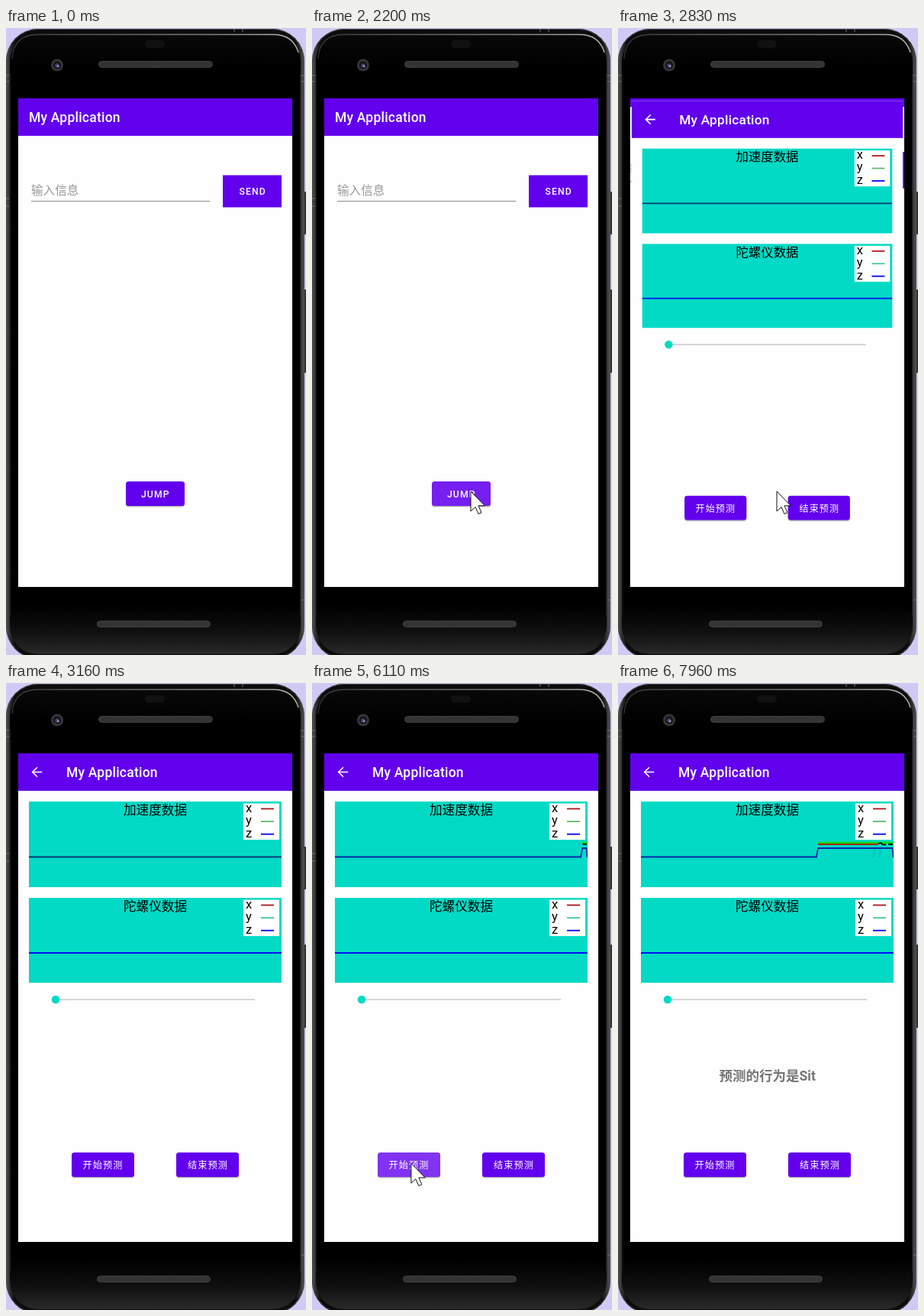
Recreate the animation shown at these times as an HTML page. Size 393x820 px, loop 8000 ms.

```html
<!DOCTYPE html>
<html lang="zh">
<head>
<meta charset="utf-8">
<title>My Application</title>
<style>
html, body { margin: 0; width: 100%; height: 100%; overflow: hidden; background: #cfcaf3; }
svg { display: block; width: 393px; height: 820px; }
text { font-family: Roboto, "Noto Sans CJK SC", "Noto Sans CJK", sans-serif; white-space: pre; }
.title { font-size: 17.5px; font-weight: 500; letter-spacing: .22px; fill: #fff; }
.label { font-size: 12.2px; font-weight: 500; letter-spacing: 1.09px; fill: #fff; }
.cn { font-weight: 400; }
.chart { font-size: 16.6px; fill: #000; }
.hint { font-size: 15.6px; fill: #999; }
.result { font-size: 17.5px; font-weight: 700; fill: #757575; }
</style>
</head>
<body>
<svg viewBox="0 0 393 820">
  <defs>
    <linearGradient id="rim" x1="0" x2="1" y1="0" y2="0">
      <stop offset="0" stop-color="#555"/>
      <stop offset=".008" stop-color="#3b3b3b"/>
      <stop offset=".03" stop-color="#0c0c0c"/>
      <stop offset=".97" stop-color="#0c0c0c"/>
      <stop offset=".99" stop-color="#3a3a3a"/>
      <stop offset="1" stop-color="#5a5a5a"/>
    </linearGradient>
    <linearGradient id="glass" x1="0" x2="0" y1="0" y2="1">
      <stop offset="0" stop-color="#080808"/>
      <stop offset=".06" stop-color="#000"/>
      <stop offset=".92" stop-color="#000"/>
      <stop offset=".965" stop-color="#101010"/>
      <stop offset="1" stop-color="#2a2a2a"/>
    </linearGradient>
    <linearGradient id="shine" x1="0" x2="1" y1="0" y2="0">
      <stop offset="0" stop-color="#333"/>
      <stop offset=".2" stop-color="#555"/>
      <stop offset=".75" stop-color="#888"/>
      <stop offset="1" stop-color="#bbb"/>
    </linearGradient>
    <pattern id="mesh" width="4" height="4" patternUnits="userSpaceOnUse">
      <rect width="4" height="4" fill="#151515"/>
      <path d="M0 0L2 2L0 4M2 0L4 2L2 4" fill="none" stroke="#626262" stroke-width=".8"/>
    </pattern>
    <clipPath id="screen"><rect x="16" y="92" width="359" height="639"/></clipPath>
    <clipPath id="plot"><rect x="30" y="155" width="331" height="112"/></clipPath>
  </defs>

  <rect width="393" height="820" fill="#cfcaf3"/>
  <g fill="#333">
    <rect x="389" y="214" width="4" height="56" rx="1"/>
    <rect x="389" y="342" width="4" height="109" rx="1"/>
  </g>
  <rect x="0" y="1" width="391" height="824" rx="42" fill="url(#rim)"/>
  <rect x=".5" y="1.5" width="390" height="823" rx="42" fill="none" stroke="#4c4c4c"/>
  <rect x="5" y="7" width="381" height="812" rx="37" fill="url(#glass)"/>
  <path d="M8 40Q10 8.500 42 8.500H350Q376 8.500 383 32" fill="none" stroke="url(#shine)" stroke-width="1.3"/>
  <path d="M6 60V770M385.500 60V770" stroke="#1c1c1c"/>
  <path d="M0 62H4M0 70H4M387 62H391M387 70H391M0 223H4M0 233H4M387 748H391M299 1V5M310 1V5" stroke="#777"/>

  <rect x="182" y="16" width="26" height="10" rx="5" fill="#111"/>
  <g stroke="#3e3e3e">
    <rect x="121.500" y="43.500" width="149" height="8" rx="4" fill="url(#mesh)"/>
    <rect x="119.500" y="775.500" width="148" height="8" rx="4" fill="url(#mesh)"/>
  </g>
  <circle cx="67" cy="48.500" r="8" fill="#363636"/>
  <circle cx="67" cy="48.500" r="5" fill="#14141c"/>
  <circle cx="67" cy="49" r="2.600" fill="#4b4b78"/>
  <circle cx="68.300" cy="50" r="1.100" fill="#c8c8e8"/>

  <g clip-path="url(#screen)">
    <rect x="16" y="92" width="359" height="639" fill="#fefefe"/>
    <g id="home">
      <rect x="16" y="92" width="359" height="639" fill="#fefefe"/>
      <rect x="16" y="92" width="359" height="49" fill="#6200ee"/>
      <text class="title" x="30" y="123">My Application</text>
      <text class="hint" x="33" y="218">输入信息</text>
      <path d="M33 226.500H267" stroke="#8c8c8c"/>
      <rect x="284" y="192.500" width="77" height="42" fill="#6200ee"/>
      <text class="label" x="305.500" y="218">SEND</text>
      <g id="jump"></g>
    </g>
    <g id="detail">
      <rect x="16" y="92" width="359" height="639" fill="#fefefe"/>
      <rect x="16" y="92" width="359" height="49" fill="#6200ee"/>
      <path d="M47.300 116.500H35M41 110.300L34.700 116.500L41 122.700" fill="none" stroke="#fff" stroke-width="1.600"/>
      <text class="title" x="79" y="123">My Application</text>
      <g id="charts"></g>
      <g clip-path="url(#plot)" fill="none">
        <path id="green" stroke="#10d810" stroke-width="2.600"/>
        <path id="red" stroke="#a82810" stroke-width="1.800"/>
        <path id="black" stroke="#0a140a" stroke-width="1.800"/>
        <path id="trail" d="M334 228L338 212M342 228L345 214" stroke="#1a8ad0" stroke-width="1.500" opacity=".4"/>
        <path id="blue" stroke-width="1.800"/>
      </g>
      <path d="M30 353H361" stroke="#0010f4" stroke-width="2"/>
      <path d="M65 414H326" stroke="#d6d6d6" stroke-width="2"/>
      <circle cx="65" cy="414" r="5.300" fill="#03dac5"/>
      <text id="result" class="result" x="132.500" y="520">预测的行为是Sit</text>
      <g id="start"></g>
      <g id="stop"></g>
    </g>
  </g>
  <path id="cursor" d="M0 0V26L6 20.500L10 29.500L14 27.700L10 18.800H18.300Z" fill="#fff" stroke="#111" stroke-width="1" stroke-linejoin="round"/>
</svg>
<script>
const $ = id => document.getElementById(id);
const LOOP = 8000;

function button(id, x, y, w, label, textX, cls) {
  const box = (dy, fill, opacity) =>
    `<rect x="${x}" y="${y + dy}" width="${w}" height="32" rx="3.5" fill="${fill}" opacity="${opacity}"/>`;
  $(id).innerHTML = box(2, '#000', .12) + box(1, '#000', .2) + box(0, '#6200ee', 1) +
    box(0, '#fff', 0) + `<text class="label ${cls}" x="${textX}" y="${y + 21}">${label}</text>`;
  return $(id).children[3];
}

function chart(y, h, name, green) {
  const rows = ['#b01414', green, '#0000ff'].map((color, i) =>
    `<text class="chart" x="314" y="${y + 13.5 + i * 16.6}">${'xyz'[i]}</text>
     <path d="M334 ${y + 9.5 + i * 16.6}h17" stroke="${color}" stroke-width="1.8"/>`);
  return `<rect x="30" y="${y}" width="331" height="${h}" fill="#03dac5"/>
    <text class="chart" x="195.5" y="${y + 16.5}" text-anchor="middle">${name}</text>
    <rect x="311" y="${y + 2.5}" width="47" height="47.5" fill="#fff"/>` + rows.join('');
}

$('charts').innerHTML = chart(155, 112, '加速度数据', '#63b868') + chart(281, 111, '陀螺仪数据', '#45c79a');
const jumpGlow = button('jump', 157, 593, 77, 'JUMP', 177, '');
const startGlow = button('start', 86, 614, 82, '开始预测', 100.5, 'cn');
button('stop', 223, 614, 82, '结束预测', 238, 'cn');

// Bursts of movement: first change, last change, number of changes
const bursts = [[600, 1400, 13], [2130, 2900, 12], [2970, 3160, 4], [4490, 5100, 10],
  [5780, 6520, 12], [6590, 7340, 12], [7410, 7960, 9]];

function stepTime(t) {
  let now = 0;
  for (const [from, to, n] of bursts) {
    if (t < from) break;
    const gap = (to - from) / (n - 1);
    now = from + gap * Math.min(n - 1, Math.floor((t - from + 8) / gap));
  }
  return now;
}

// Cursor visits: [time, x, y]
const visits = [
  [[600, 7, 529], [800, 86, 574], [1000, 166, 614], [1133, 190, 622], [1270, 202, 612], [1400, 208, 606],
    [2900, 208, 606], [3150, 75, 690]],
  [[4490, 3, 745], [4700, 66, 690], [4900, 117, 643], [5100, 132, 628],
    [5780, 132, 628], [6110, 130, 628], [6240, 128, 631], [6515, 0, 721]]
];

function track(keys, t) {
  let i = 1;
  while (i < keys.length - 1 && keys[i][0] < t) i++;
  const [a, b] = [keys[i - 1], keys[i]];
  const p = Math.max(0, Math.min(1, (t - a[0]) / (b[0] - a[0])));
  return a.slice(1).map((v, k) => v + (b[k + 1] - v) * p);
}

function bezier(u, a, b, c, d) {
  const v = 1 - u;
  return v * v * v * a + 3 * v * v * u * b + 3 * v * u * u * c + u * u * u * d;
}

// Fast out, extra slow in
function ease(x) {
  if (x <= 0) return 0;
  if (x >= 1) return 1;
  const early = x < 1 / 6;
  const xs = early ? [0, .05, .13333, 1 / 6] : [1 / 6, .20833, .25, 1];
  const ys = early ? [0, 0, .06, .4] : [.4, .82, 1, 1];
  let lo = 0, hi = 1;
  for (let i = 0; i < 24; i++) {
    const mid = (lo + hi) / 2;
    if (bezier(mid, ...xs) < x) lo = mid; else hi = mid;
  }
  return bezier(lo, ...ys);
}

const show = (el, on) => el.setAttribute('visibility', on ? 'visible' : 'hidden');
const zoom = (el, s) =>
  el.setAttribute('transform', `translate(195.5 411.5) scale(${s}) translate(-195.5 -411.5)`);

function drawPlot(t) {
  const x = 353 - .0500 * (t - 6110);
  const live = x < 360;
  for (const id of ['green', 'red', 'black']) show($(id), live);
  show($('trail'), x < 333);
  $('blue').setAttribute('stroke', live ? '#0428a8' : '#063c78');
  if (!live) {
    $('blue').setAttribute('d', 'M30 227.500H361');
    return;
  }
  $('blue').setAttribute('d', `M30 227.500H${x - .5}L${x + 1.5} 216H359.500L360.500 228`);
  $('green').setAttribute('d', `M${x + 1} 209H361`);
  $('red').setAttribute('d', x < 340 ? `M${x + 1.5} 211H341` : '');
  $('black').setAttribute('d', x < 340
    ? 'M341 210L344 209L347 211.500H351M354 211H360'
    : `M${x + 2} 211H360`);
}

function draw(time) {
  const t = stepTime(time);
  const p = ease((t - 2655) / 400);
  zoom($('home'), 1 + .15 * p);
  zoom($('detail'), .85 + .15 * p);
  $('detail').setAttribute('opacity', Math.max(0, Math.min(1, (t - 2692) / 50)));
  show($('home'), t < 3100);

  const press = (from, a, b, to) => track([[from, .04], [a, .2], [b, .2], [to, 0]], t)[0];
  jumpGlow.setAttribute('opacity', t < 2130 ? 0 : press(2130, 2270, 2410, 2680));
  startGlow.setAttribute('opacity', t < 5780 ? 0 : press(5780, 5920, 6120, 6400));
  drawPlot(t);
  $('result').setAttribute('opacity', t > 6375 ? 1 : 0);

  const visit = visits.find(v => t >= v[0][0] && t <= v[v.length - 1][0]);
  show($('cursor'), visit);
  if (visit) $('cursor').setAttribute('transform', `translate(${track(visit, t).join(' ')})`);
}

const began = performance.now();
function tick() {
  draw((performance.now() - began) % LOOP);
  requestAnimationFrame(tick);
}
tick();
</script>
</body>
</html>
```
